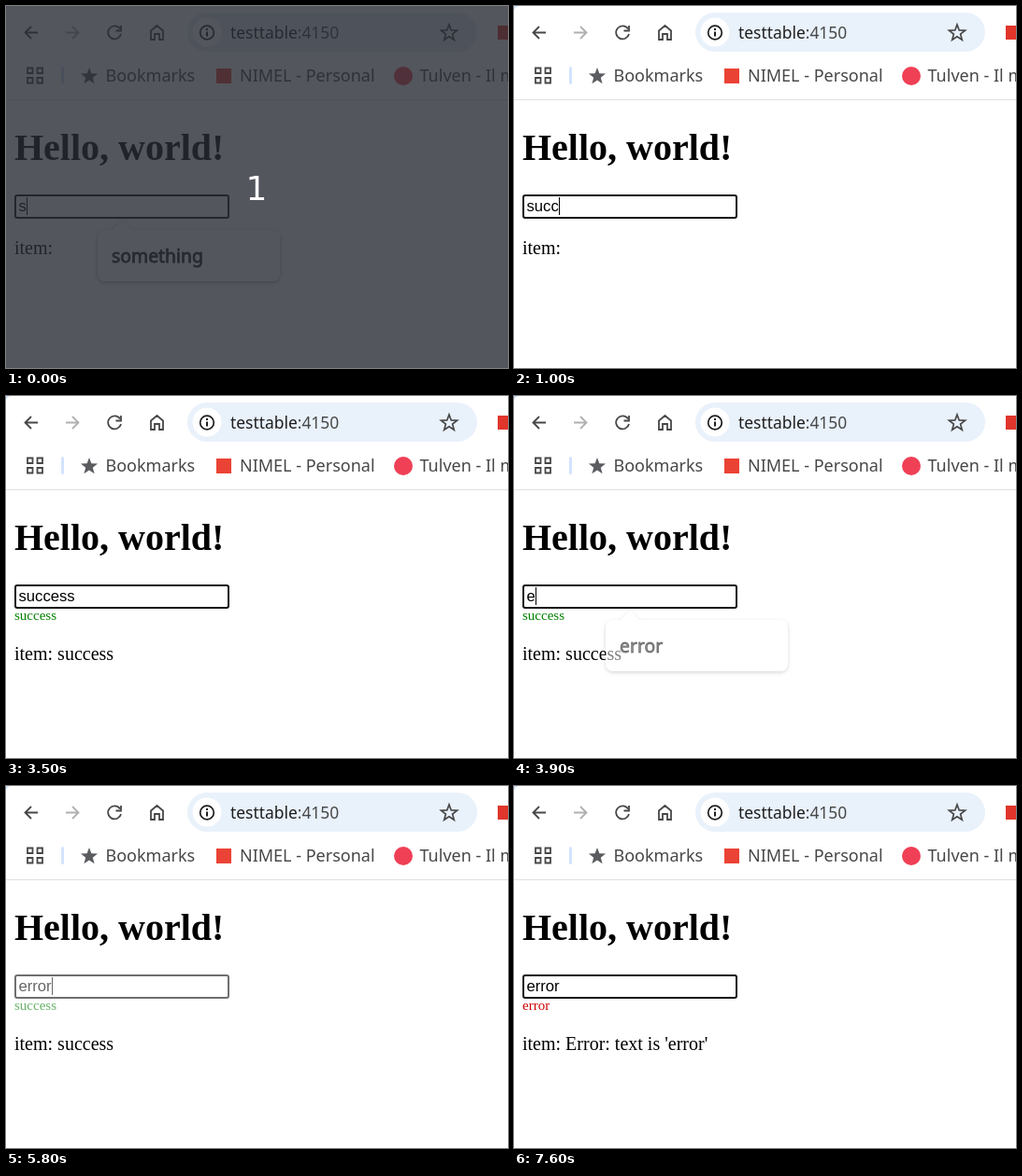
Write an HTML page with a canvas that moves like this. It is 537 by 388 pixels and loops after 7800 ms.

```html
<!DOCTYPE html>
<html lang="en">
<head>
<meta charset="utf-8">
<title>Form demo</title>
<style>
  html, body { margin: 0; width: 100%; height: 100%; overflow: hidden; background: #fff; }
  canvas { display: block; }
</style>
</head>
<body>
<canvas id="stage" width="537" height="388"></canvas>
<script>
const W = 537, H = 388, LOOP = 7800, TICK = 100;
const ctx = document.getElementById('stage').getContext('2d');

const UI = '"Noto Sans", "Open Sans", sans-serif';
const SERIF = '"Liberation Serif", "Noto Serif", serif';
const SANS = '"Liberation Sans", sans-serif';
const INK = '#474747', DARK = '#1f1f1f';

// Timeline, in ms
const TYPED = [
  [0, 's'], [700, 'su'], [900, 'suc'], [1000, 'succ'], [1200, 'succe'],
  [1500, 'succes'], [1700, 'success'], [3900, 'e'], [4200, 'er'],
  [4300, 'err'], [4500, 'erro'], [4600, 'error']
];
const CARET_OFF = [[500, 700], [2200, 2800], [3500, 3900], [5200, 5800], [6400, 7000], [7600, 7800]];
const PENDING = [[1800, 2900], [4800, 5900]];
const SELECTED = [3600, 3900];
const RESULTS = [
  [0, '', '', ''],
  [2900, 'success', '#008000', 'success'],
  [5900, 'error', '#d00000', "Error: text is 'error'"]
];
const POPUP = [
  [0, 'something', 1], [700, 'something', 0.85], [800, 'something', 0.3], [900, '', 0],
  [3900, 'error', 0.5], [4000, 'error', 1], [4600, 'error', 0.93], [4700, 'error', 0.3], [4800, '', 0]
];

const BUBBLE = new Path2D('M107 240H114L122.5 231.5Q124 230 125.5 231.5L134 240H284Q293 240 293 249V286Q293 295 284 295H107Q98 295 98 286V249Q98 240 107 240Z');
const AROUND_BUBBLE = new Path2D();
AROUND_BUBBLE.rect(0, 0, W, H);
AROUND_BUBBLE.addPath(BUBBLE);

const within = (t, [a, b]) => t >= a && t < b;
const latest = (list, t) => list.filter(k => k[0] <= t).pop();

function text(str, x, y, font, color) {
  ctx.font = font;
  ctx.fillStyle = color;
  ctx.fillText(str, x, y);
  return x + ctx.measureText(str).width;
}

function rect(x, y, w, h, color) {
  ctx.fillStyle = color;
  ctx.fillRect(x, y, w, h);
}

function round(x, y, w, h, r, color) {
  ctx.beginPath();
  ctx.roundRect(x, y, w, h, r);
  ctx.fillStyle = color;
  ctx.fill();
}

function disc(x, y, r, color) {
  ctx.beginPath();
  ctx.arc(x, y, r, 0, Math.PI * 2);
  ctx.fillStyle = color;
  ctx.fill();
}

function stroke(d, color = INK, width = 1.8) {
  ctx.strokeStyle = color;
  ctx.lineWidth = width;
  ctx.stroke(new Path2D(d));
}

function star(cx, cy, r, inner) {
  ctx.beginPath();
  for (let i = 0; i < 10; i++) {
    const a = -Math.PI / 2 + i * Math.PI / 5, k = i % 2 ? r * inner : r;
    ctx.lineTo(cx + k * Math.cos(a), cy + k * Math.sin(a));
  }
  ctx.closePath();
}

function drawToolbar() {
  ctx.fillStyle = '#d3e3fd';
  ctx.fill(new Path2D('M0 0H5Q1 1 0 5Z'));

  stroke('M34 28.5H21M27 22L20.5 28.5L27 35');
  stroke('M64 28.5H77M71 22L77.5 28.5L71 35', '#b0b0b0');
  stroke('M122 24.5A7 7 0 1 0 123 30');
  stroke('M123 21V26.5H117.5');
  stroke('M155 26.5L161.5 21L168 26.5V36H164V30H159V36H155Z');

  round(194, 7, 310, 42, 21, '#e9f1fb');
  disc(215, 28, 15.5, '#fff');
  ctx.beginPath();
  ctx.arc(215, 28.5, 7.3, 0, Math.PI * 2);
  ctx.strokeStyle = DARK;
  ctx.lineWidth = 1.7;
  ctx.stroke();
  rect(214, 27.5, 2, 5, DARK);
  rect(214, 24, 2, 2, DARK);
  const end = text('testtable', 240, 35, '17.4px ' + UI, DARK);
  text(':4150', end, 35, '17.4px ' + UI, INK);

  star(474, 29, 9, 0.42);
  ctx.strokeStyle = INK;
  ctx.lineWidth = 1.7;
  ctx.stroke();
  rect(526, 21, 15, 15, '#e0352b');
}

function drawBookmarks() {
  const font = '18px ' + UI;
  stroke('M23 66.5h5.5v5.5h-5.5zM33.5 66.5h5.5v5.5h-5.5zM23 77h5.5v5.5h-5.5zM33.5 77h5.5v5.5h-5.5z');
  round(59, 65, 3, 19, 1.5, '#d3e3fd');
  star(89, 75.5, 9.5, 0.42);
  ctx.fillStyle = '#5a5c60';
  ctx.fill();
  text('Bookmarks', 106.5, 81, font, INK);
  rect(225, 67, 16, 16, '#ea4335');
  text('NIMEL - Personal', 250, 81, font, INK);
  disc(425, 75, 10, '#ef4056');
  text('Tulven - Il mondo', 442.5, 81, font, INK);
  rect(0, 100, W, 1, '#dfe1e5');
}

function drawForm(t, result) {
  const value = latest(TYPED, t)[1], font = '16.667px ' + SANS, x = 13.5;
  ctx.globalAlpha = PENDING.some(p => within(t, p)) ? 0.6 : 1;
  ctx.beginPath();
  ctx.roundRect(10, 203, 228, 24, 2);
  ctx.strokeStyle = '#101010';
  ctx.lineWidth = 2;
  ctx.stroke();

  ctx.font = font;
  const width = ctx.measureText(value).width;
  if (within(t, SELECTED)) rect(x, 205, width, 19, '#1e90ff');
  text(value, x, 220, font, '#000');
  if (!CARET_OFF.some(c => within(t, c))) rect(Math.round(x + width), 205, 1, 19, '#000');
  text(result[1], 9, 240, '15px ' + SERIF, result[2]);
  ctx.globalAlpha = 1;
}

function drawPopup([, label, alpha]) {
  if (!alpha) return;
  ctx.globalAlpha = alpha;

  // Shadow only outside the bubble, so that it stays white while fading
  ctx.save();
  ctx.clip(AROUND_BUBBLE, 'evenodd');
  ctx.shadowColor = 'rgba(0,0,0,.32)';
  ctx.shadowBlur = 4;
  ctx.shadowOffsetY = 1.5;
  ctx.fillStyle = '#fff';
  ctx.fill(BUBBLE);
  ctx.restore();

  ctx.fillStyle = '#fff';
  ctx.fill(BUBBLE);
  text(label, 113, 275, '19.4px ' + UI, DARK);
  ctx.strokeStyle = DARK;
  ctx.lineWidth = 0.8;
  ctx.strokeText(label, 113, 275);
  ctx.globalAlpha = 1;
}

function drawCountdown() {
  rect(0, 0, W, H, 'rgba(40,44,52,.8)');
  ctx.textAlign = 'center';
  text('1', 268, 208, '36px "DejaVu Sans", sans-serif', '#fff');
  ctx.textAlign = 'left';
}

function draw(t) {
  const result = latest(RESULTS, t);
  rect(0, 0, W, H, '#fff');
  drawToolbar();
  drawBookmarks();
  text('Hello, world!', 9, 165, 'bold 40px ' + SERIF, '#000');
  drawForm(t, result);
  text('item: ' + result[3], 9, result[1] ? 283 : 266, '20px ' + SERIF, '#000');
  drawPopup(latest(POPUP, t));
  if (t < 100) drawCountdown();
}

const start = performance.now();
function loop() {
  const t = (performance.now() - start) % LOOP;
  draw(Math.floor(t / TICK) * TICK);
  requestAnimationFrame(loop);
}
loop();
</script>
</body>
</html>
```
